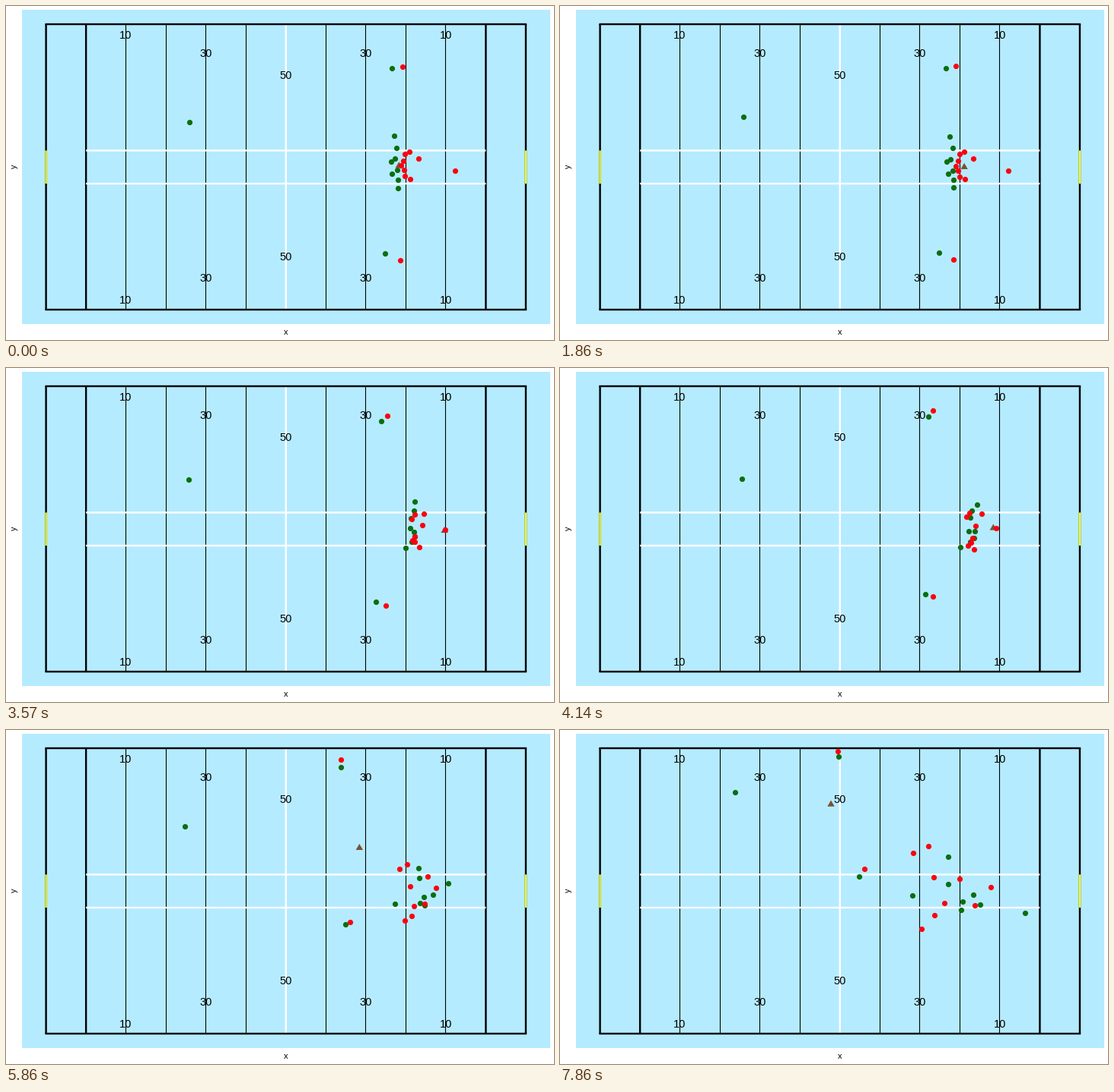
Write a matplotlib script that moves like this. It is 720 px wide and 440 px high and loops after 8 s.

```python
import numpy as np
import matplotlib.pyplot as plt
from matplotlib.animation import FuncAnimation
from matplotlib.patches import Rectangle

W, H, DPI = 720, 440, 100
FRAMES, LOOP_MS = 56, 8000
PX = 72 / DPI  # points per pixel

SKY, GREEN, RED = "#b5ebff", "#0b6e0f", "#fb0010"
BROWN, YELLOW = "#7a5230", "#f6fb1c"

LEFT, TOP, BOTTOM, STEP = 52.1, 24, 400, 52.53
HASH = (190.4, 234)

SET, SNAP, CATCH, KICK, END = 13, 11, 20, 29, FRAMES - 1

plt.rcParams["font.family"] = "Liberation Sans"
fig = plt.figure(figsize=(W / DPI, H / DPI), dpi=DPI, facecolor="white")
ax = fig.add_axes([0, 0, 1, 1])
ax.set(xlim=(0, W), ylim=(H, 0))
ax.axis("off")


def yard(k):
    return LEFT + STEP * k


def line(xs, ys, color, z, width=2.4, **kw):
    ax.plot(xs, ys, color=color, lw=width * PX, zorder=z, **kw)


def thick(xs, ys, color, z, cap="butt"):
    line(np.array(xs) + 0.5, ys, color, z, snap=False, solid_capstyle=cap)


def label(x, y, text, size, **kw):
    ax.text(x, y, text, fontsize=size * PX, ha="center", zorder=5, **kw)


def draw_field():
    ax.add_patch(Rectangle((21, 5.4), 693.5, 413.2, color=SKY, lw=0, zorder=0))
    for k in range(13):
        xs, ys = [yard(k)] * 2, [TOP, BOTTOM]
        if k in (0, 1, 11, 12):
            thick(xs, ys, "black", 1)
        elif k == 6:
            thick(xs, ys, "white", 2)
        else:
            line(xs, ys, "black", 1, 1.1, solid_capstyle="butt")
    for y in HASH:
        thick([yard(1), yard(11)], [y, y], "white", 2)
    for y in (TOP, BOTTOM):
        thick([yard(0), yard(12)], [y, y], "black", 3, "projecting")
    for k in (0, 12):
        thick([yard(k)] * 2, HASH, YELLOW, 3)

    # Yard numbers step inwards from both ends
    for k, text, top, low in [(2, "10", 38, 387), (4, "30", 62, 358), (6, "50", 91, 330)]:
        for col in {k, 12 - k}:
            for y in (top, low):
                label(yard(col) + 0.2, y + 5, text, 14.6, va="baseline")
    label(367.6, 432.8, "x", 11, va="baseline")
    label(11, 211.4, "y", 11, va="center", rotation=90)


class Unit:
    """Players who share a creep before the snap.

    Each path is three points: set, halfway through the run, end.
    """

    def __init__(self, paths, creep=(0, 0)):
        self.a, self.m, self.c = np.array(paths, float).swapaxes(0, 1)
        self.creep = np.array(creep)

    def at(self, n):
        s = run(n)
        curve = ((1 - s) * (1 - 2 * s) * self.a + 4 * s * (1 - s) * self.m
                 + s * (2 * s - 1) * self.c)
        return curve + self.creep * max(0, 1 - n / SET)


def run(n, ramp=8):
    """Share of the run done: stand, speed up, then a steady pace."""
    t, total = max(0, n - SNAP), END - SNAP
    return t * t / (t + ramp) * (total + ramp) / total ** 2


returner = Unit([[(240.8, 145.2), (237, 137), (230.3, 82)]], creep=(0.3, 7.6))
rush = Unit([
    [(510.7, 171.4), (568, 191), (611, 241)],
    [(514.5, 187), (545, 185), (510, 167)],
    [(506.7, 205), (545, 195), (510, 203.5)],
    [(511.7, 201.5), (546, 219), (543, 217)],
    [(508.4, 221), (557, 215), (552, 230.5)],
    [(514.8, 216.5), (550, 228), (527, 237)],
    [(516.2, 229.5), (544, 228), (529, 226)],
    [(516, 239.6), (520, 232), (463, 218.5)],
], creep=(-1.2, 0))
jammers = Unit([
    [(507, 82.5), (461, 55), (366, 35.5)],
    [(498, 326), (462, 275), (393, 193.5)],
])
shield = Unit([
    [(529.8, 192), (557, 192), (524.5, 196)],
    [(524.3, 195.5), (535, 184), (483.5, 153)],
    [(522, 204.5), (528, 189), (463.6, 162)],
    [(542.2, 201), (540, 208), (491, 194)],
    [(518.8, 210.3), (533, 245), (474.5, 262.5)],
    [(522.5, 216.5), (548, 227), (545, 231.5)],
    [(523.9, 224.3), (540, 232), (505.3, 228.5)],
    [(531.4, 228), (541, 243), (491.5, 244)],
    [(589.5, 216.8), (567, 209), (565.8, 206.6)],
])
gunners = Unit([
    [(521, 80.4), (463, 45), (365, 28)],
    [(517.7, 334.6), (469, 275), (399.7, 182.8)],
])
teams = {GREEN: (returner, rush, jammers), RED: (shield, gunners)}

SPOT, HANDS, BOOT, LANDING = np.array(
    [(516.3, 210.6), (583, 217.9), (567.6, 210), (356, 98)])


def ball_at(n):
    """Straight snap, carry and kick; the kick loses a little speed."""
    if n < CATCH:
        return SPOT + (HANDS - SPOT) * max(0, n - SNAP) / (CATCH - SNAP)
    if n < KICK:
        return HANDS + (BOOT - HANDS) * (n - CATCH) / (KICK - CATCH)
    u = (n - KICK) / (END - KICK)
    return BOOT + (LANDING - BOOT) * u * (1 + 0.107 * (1 - u))


draw_field()
TRIANGLE = np.array([[0, -5.4], [4.7, 2.7], [-4.7, 2.7]])
dots = {c: ax.scatter([], [], s=(7.2 * PX) ** 2, color=c, lw=0, zorder=z)
        for c, z in ((GREEN, 6), (RED, 8))}
ball, = ax.fill([0, 0, 0], [0, 0, 0], color=BROWN, lw=0, zorder=7)


def draw(n):
    for color, units in teams.items():
        dots[color].set_offsets(np.concatenate([u.at(n) for u in units]))
    ball.set_xy(TRIANGLE + ball_at(n))
    return *dots.values(), ball


anim = FuncAnimation(fig, draw, frames=FRAMES, interval=LOOP_MS / FRAMES,
                     repeat=True, repeat_delay=0)
plt.show()
```
